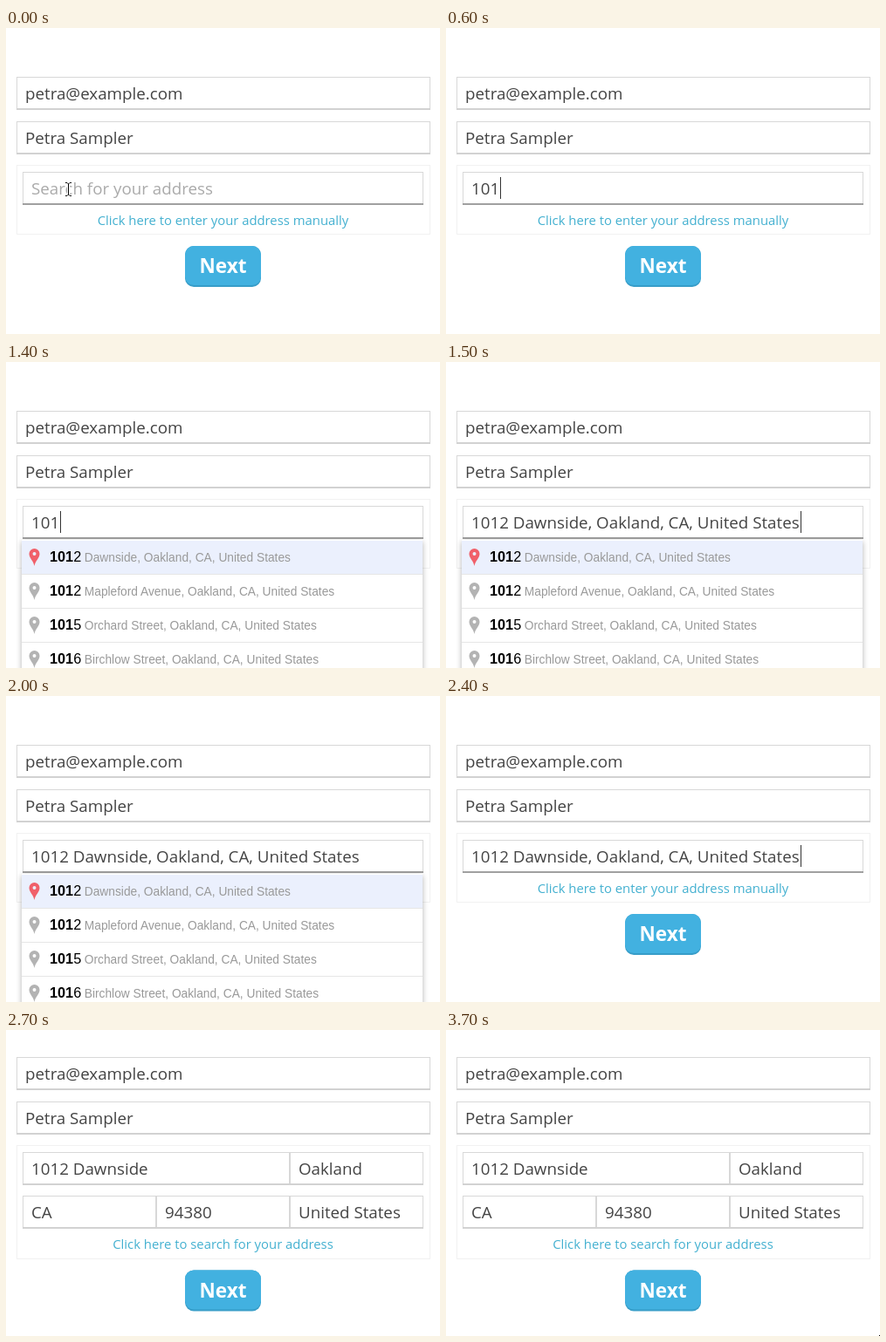
An HTML page that plays this animation: 497x351 px, repeating every 3.8 s.

```html
<!DOCTYPE html>
<html lang="en">
<head>
<meta charset="utf-8">
<title>Address form</title>
<style>
  html, body { margin: 0; width: 100%; height: 100%; overflow: hidden; background: #fff; }
  svg { display: block; }
  text { font: 18.75px "Open Sans", sans-serif; fill: #444; white-space: pre; }
  .link { font-size: 14.85px; fill: #43b0d0; text-anchor: middle; }
  .next { font-size: 22.5px; font-weight: 700; fill: #fff; text-anchor: middle; }
  .num { font: 16.25px "Liberation Sans", Arial, sans-serif; fill: #000; }
  .num tspan { font-weight: 700; }
  .street { font: 13.75px "Liberation Sans", Arial, sans-serif; fill: #999; }
  #hint { fill: #aaa; }
  #list { filter: drop-shadow(0 2px 3px rgba(0, 0, 0, .3)); }
</style>
</head>
<body>
<svg id="stage" width="497" height="351" viewBox="0 0 497 351"></svg>
<script>
const LOOP = 3800;
const PLACE = 'Oakland, CA, United States';
const FULL = '1012 Dawnside, ' + PLACE;
const ROWS = [
  ['2', 'Dawnside'],
  ['2', 'Mapleford Avenue'],
  ['5', 'Orchard Street'],
  ['6', 'Birchlow Street']
];

const rect = (x, y, w, h, fill, more = '') =>
  `<rect x="${x}" y="${y}" width="${w}" height="${h}" fill="${fill}" ${more}/>`;
const label = (x, y, str, more = '') => `<text x="${x}" y="${y}" ${more}>${str}</text>`;

const field = (x, y, w, str = '', base = '#d2d2d2') =>
  rect(x, y, w, 38, '#d8d8d8') + rect(x + 1, y + 1, w - 2, 36, '#fff') +
  rect(x, y + 36, w, 2, base) + label(x + 10, y + 26, str);

const panel = (y, h) =>
  rect(12.5, y + .5, 473, h - 1, '#fff', 'stroke="#f1f1f1"');

const button = y =>
  rect(205, y, 87, 47, '#379dc8', 'rx="10"') + rect(205, y, 87, 45, '#42b1e0', 'rx="10"') +
  label(248.5, y + 31, 'Next', 'class="next"');

const person = y =>
  field(12, y, 474, 'petra@example.com') + field(12, y + 51, 474, 'Petra Sampler');

const row = ([digit, street], i) => {
  const y = 205 + 39 * i;
  return rect(18, y, 459, 38, '#fff', 'class="back"') + rect(18, y + 38, 459, 1, '#e6e6e6') +
    `<path class="pin" fill="#b3b3b3" fill-rule="evenodd" transform="translate(32.5 ${y + 15})"
      d="M0 14C-1 8-6 5-6 0A6 6 0 0 1 6 0C6 5 1 8 0 14ZM-2 0A2 2 0 0 0 2 0A2 2 0 0 0-2 0Z"/>` +
    label(50, y + 24, `<tspan>101</tspan>${digit}`, 'class="num"') +
    label(89.8, y + 24, `${street}, ${PLACE}`, 'class="street"');
};

const ibeam = 'M68 177.5H70L71.5 179L73 177.5H75M71.5 179V191M68 192.5H70L71.5 191L73 192.5H75';

stage.innerHTML = `
  <g id="search">
    ${person(56)}${panel(157, 80)}${field(19, 165, 459, '', '#a0a0a0')}
    ${label(29, 191, 'Search for your address', 'id="hint"')}
    ${label(29, 191, '', 'id="typed"')}
    ${label(248.5, 226, 'Click here to enter your address manually', 'class="link"')}
    ${button(250)}
    <g id="list">${rect(18, 204, 459, 150, '#fff')}${ROWS.map(row).join('')}</g>
    ${rect(0, 171, 1, 25, '#333', 'id="caret"')}
    <g id="mouse" fill="none">
      <path d="${ibeam}" stroke="#fff" stroke-width="3"/><path d="${ibeam}" stroke="#000"/>
    </g>
  </g>
  <g id="details">
    ${person(31)}${panel(132, 131)}
    ${field(19, 140, 306, '1012 Dawnside')}${field(325, 140, 153, 'Oakland')}
    ${field(19, 190, 153, 'CA')}${field(172, 190, 153, '94380')}${field(325, 190, 153, 'United States')}
    ${label(248.5, 251, 'Click here to search for your address', 'class="link"')}
    ${button(275.5)}
    ${rect(496, 350, 1, 1, '#000', 'id="dot"')}
  </g>`;

const $ = id => document.getElementById(id);
const show = (id, on) => $(id).style.display = on ? '' : 'none';
const back = document.querySelector('.back'), pin = document.querySelector('.pin');

function draw(now) {
  const t = now % LOOP;
  const picked = t >= 1400, filled = t >= 1500;
  const count = t < 300 ? 0 : t < 500 ? 1 : t < 600 ? 2 : 3;

  show('search', t < 2600);
  show('details', t >= 2600);
  show('dot', t >= 3700);
  show('hint', t < 300);
  show('mouse', t < 300);
  show('list', t >= 900 && t < 2400);
  show('caret', t >= 300 && !(t >= 2000 && t < 2400));

  $('typed').textContent = filled ? FULL : FULL.slice(0, count);
  $('caret').setAttribute('x', filled ? 406 : Math.round(30 + 10.73 * count));
  back.setAttribute('fill', picked ? '#ebf0fd' : '#fff');
  pin.setAttribute('fill', picked ? '#f0606a' : '#b3b3b3');
  requestAnimationFrame(draw);
}

const start = performance.now();
requestAnimationFrame(function first() {
  draw(0);
});
// Count time from page load so every loop begins with the empty search field.
const base = draw;
draw = now => base(Math.max(0, performance.now() - start));
</script>
</body>
</html>
```
